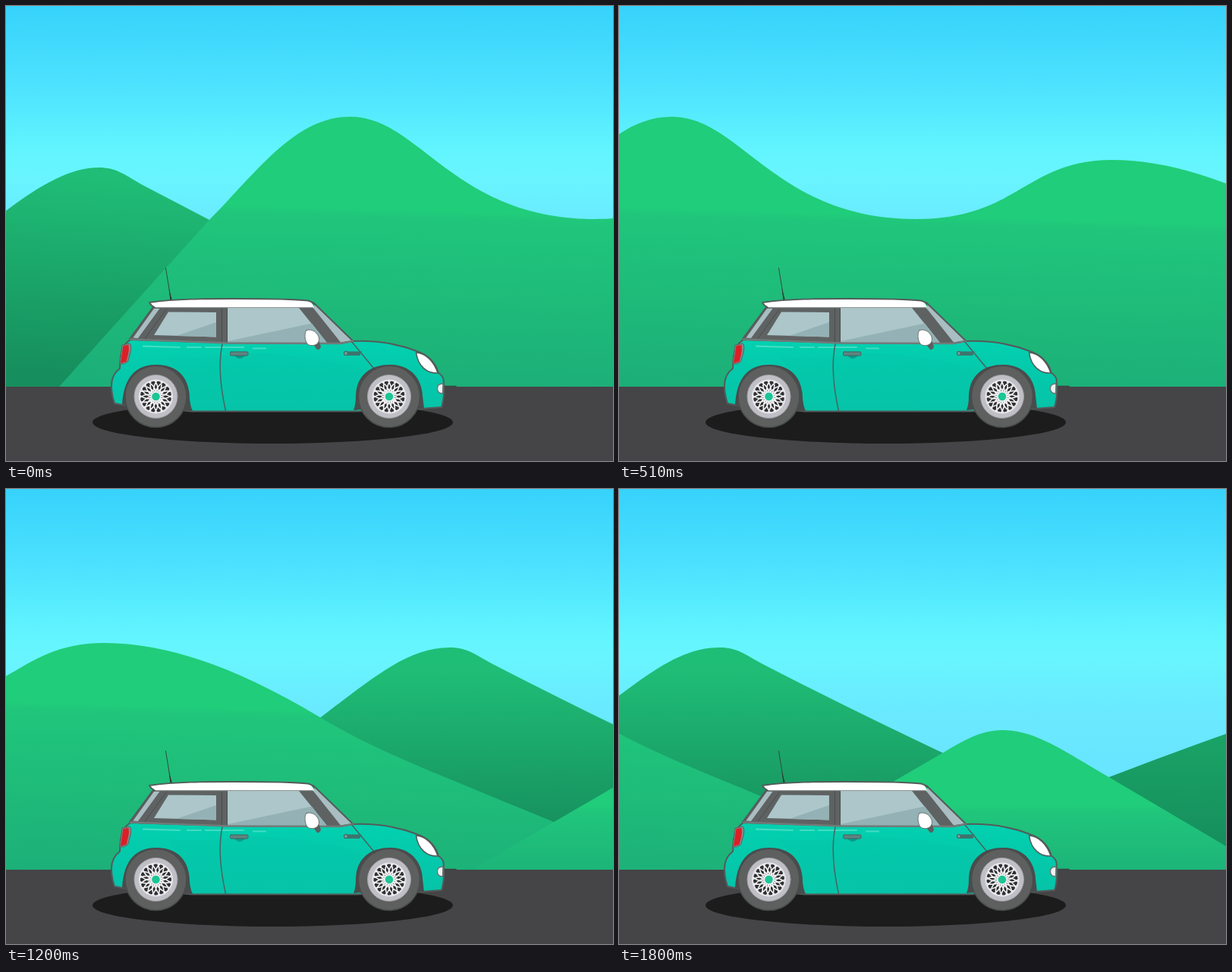
An HTML page that plays this animation: 800 px wide and 600 px high, repeating every 1830 ms.

```html
<!DOCTYPE html>
<html lang="en">
<head>
<meta charset="utf-8">
<title>Driving past the hills</title>
<style>
  html, body { margin: 0; width: 100%; height: 100%; overflow: hidden; background: #454547; }
  svg { display: block; width: 800px; height: 600px; }
</style>
</head>
<body>
<svg viewBox="0 0 800 600" xmlns="http://www.w3.org/2000/svg">
  <defs>
    <linearGradient id="sky" gradientUnits="userSpaceOnUse" x1="0" y1="0" x2="0" y2="400">
      <stop offset="0" stop-color="#37d2fb"/>
      <stop offset=".25" stop-color="#4ce1fe"/>
      <stop offset=".48" stop-color="#62f5ff"/>
      <stop offset=".56" stop-color="#68f5ff"/>
      <stop offset=".72" stop-color="#6aeaff"/>
      <stop offset="1" stop-color="#68e3ff"/>
    </linearGradient>
    <linearGradient id="front" gradientUnits="userSpaceOnUse" x1="285" y1="262" x2="278" y2="502">
      <stop offset="0" stop-color="#20cd7a"/>
      <stop offset=".04" stop-color="#20c67b"/>
      <stop offset="1" stop-color="#1cae78"/>
    </linearGradient>
    <linearGradient id="low" gradientUnits="userSpaceOnUse" x1="0" y1="418" x2="0" y2="502">
      <stop offset="0" stop-color="#20cd7a"/>
      <stop offset=".08" stop-color="#20c67b"/>
      <stop offset="1" stop-color="#1db479"/>
    </linearGradient>
    <linearGradient id="backA" gradientUnits="userSpaceOnUse" x1="100" y1="225" x2="82" y2="490">
      <stop offset="0" stop-color="#1fbd76"/>
      <stop offset="1" stop-color="#168e5d"/>
    </linearGradient>
    <linearGradient id="backB" gradientUnits="userSpaceOnUse" x1="0" y1="235" x2="0" y2="440">
      <stop offset="0" stop-color="#1fbe77"/>
      <stop offset="1" stop-color="#17925f"/>
    </linearGradient>
    <linearGradient id="backC" gradientUnits="userSpaceOnUse" x1="0" y1="320" x2="0" y2="480">
      <stop offset="0" stop-color="#1aa467"/>
      <stop offset="1" stop-color="#168d5c"/>
    </linearGradient>
    <linearGradient id="paint" gradientUnits="userSpaceOnUse" x1="0" y1="440" x2="0" y2="535">
      <stop offset="0" stop-color="#02d1b0"/>
      <stop offset=".4" stop-color="#04caac"/>
      <stop offset="1" stop-color="#06c3a8"/>
    </linearGradient>

    <g id="tyre">
      <circle r="40.500" fill="#5e5f5f" stroke="#4b4d4d" stroke-width="1.5"/>
      <circle r="28.500" fill="#c0bfc6" stroke="#a09fa6"/>
      <circle r="22.500" fill="#e6e5ea"/>
    </g>
  </defs>

  <rect width="800" height="510" fill="url(#sky)"/>

  <g id="hills">
    <path fill="url(#backA)" d="M-80 340L0 270C45 236 85 213 122 213C145 213 156 222 178 235L268 282L688 502H-80Z"/>
    <path fill="url(#backC)" d="M1720 502L2002 380Q2080 350 2156 323L2250 290V502Z"/>
    <path fill="url(#backB)" d="M1040 502L1319 301C1390 247 1435 209 1489 209C1513 209 1523 219 1546 231Q1660 290 1783 348L2093 502Z"/>
    <path fill="url(#front)" d="M70 502L268 282C335 214 382 146 454 146C545 146 590 281 776 281C910 281 920 203 1034 203
      C1130 203 1230 248 1318 301C1395 347 1460 370 1626 439L1770 502Z"/>
    <path fill="url(#low)" d="M1518 502L1783 348C1810 332 1833 318 1861 318C1905 318 1940 344 2002 380L2209 502Z"/>
  </g>

  <rect y="502" width="800" height="98" fill="#454547"/>
  <ellipse cx="351.500" cy="549" rx="237.500" ry="28" fill="#1c1c1c"/>

  <g id="car" stroke-linejoin="round" stroke-linecap="round">
    <path d="M210.500 345.500L217.500 388" fill="none" stroke="#2f4a40"/>
    <path d="M214.500 372L216.500 388H219Z" fill="#2f3836"/>
    <path d="M576 501.500H593" stroke="#3b4542" stroke-width="1.600"/>

    <!-- body -->
    <path fill="url(#paint)" stroke="#535b5a" stroke-width="2" d="M164 440C156 445 153 452 151 463L150 478
      C143 483 139 490 139 501C139 510 141 518 143 524L153 526L245 534.500H462L548 531L574 529C577 520 578 508 576.500 492
      Q575 487 570 484C566 470 556 460 541 455C515 445 485 441 457 442L440 445L292 444Z"/>
    <path d="M210 461C250 470 300 456 350 459S440 470 470 480L462 533H245L235 490Z" fill="#06c3a8" opacity=".4"/>

    <!-- cabin -->
    <path d="M163 439L194 397H403L457 442L440 445L292 444Z" fill="#5f6262"/>
    <path d="M167.500 437.500L195 399H202.500L174 438Z" fill="#a9bec2"/>
    <path d="M183 438.500L212 399" fill="none" stroke="#4a4e4e"/>
    <path d="M195 434L214 403.500L277 404V436.500Z" fill="#acc6ca"/>
    <path d="M224 435L277 417V436.500Z" fill="#94b2b5"/>
    <path d="M284.500 399V443M291.500 399V443" stroke="#484c4c"/>
    <path d="M292 398H386L423 444L292 443.500Z" fill="#acc6ca"/>
    <path d="M292 442L403 418.500L423 444L292 443.500Z" fill="#94b2b5"/>
    <path d="M404 397L408 394L456 441L441 443.500Z" fill="#a9bec2"/>
    <path d="M405 391L457 441.500M163 439L194 397" fill="none" stroke="#535b5a" stroke-width="2"/>
    <path d="M164 439.500L292 444.500L440 445L457 442" fill="none" stroke="#717b7a" stroke-width="2.400"/>

    <!-- roof -->
    <path d="M189 391C225 386 262 386 300 386C342 386 375 386 398 388.500Q403 389.500 406 397.500H196Q191 395 189 391Z" fill="#fff"/>
    <path d="M196 397.700H404" stroke="#8b9292" stroke-width=".8"/>
    <path d="M196 397.500Q191 395 189 391C225 386 262 386 300 386C342 386 375 386 398 388.500Q403 389.500 406 393"
      fill="none" stroke="#535b5a" stroke-width="1.800"/>

    <!-- trim -->
    <path d="M181 448.700L229 450M239 450H257M263 450H313M326 451.500H342" fill="none" stroke="#43dcc3" stroke-width="2.200"/>
    <path d="M285 446C280 470 282 500 289.500 534M456 443L484 477" fill="none" stroke="#466460" stroke-width="1.500"/>
    <path d="M301 461Q308 469 315 461Z" fill="#079c8a"/>
    <rect x="295.500" y="456" width="23.500" height="5" rx="1.500" fill="#5d8581" stroke="#46615e"/>
    <path d="M446 455.500H469L466 461H446Z" fill="#3c756e"/>
    <circle cx="448" cy="458" r="2.700" fill="#6d9994" stroke="#46615e"/>
    <path d="M403 444L412 441L415 449Q414 454 410 453Z" fill="#5a5f5f"/>
    <path d="M396 427.500C404 425 411 431 412.500 438C413 445 408 448.500 401 447.500C394 447 392 432 396 427.500Z" fill="#fff" stroke="#6b7272"/>
    <path d="M153.500 447L163 445Q166 448 164 457L160.500 469Q156 473 150 472Z" fill="#8b8587" stroke="#5c6262"/>
    <path d="M154.500 448L161.500 447Q162.500 452 161 459L158.500 469L151 471Z" fill="#dc1f26"/>
    <path d="M540.500 457C553 458 564 468 569 484C555 485 543 475 540.500 457Z" fill="#fff" stroke="#535b5a" stroke-width="1.600"/>
    <path d="M576 498Q568 498 568.500 505Q569 511 575.500 511Z" fill="#eef1f1" stroke="#6b7675" stroke-width="1.400"/>

    <!-- wheel arches -->
    <path d="M153 526C155 490 171 473 198 473C228 473 242 492 242 518Q243 528 246 534H220Z" fill="#484c4c"/>
    <path d="M458 533Q461 526 461 514C462 488 479 473 506 473C533 473 548 491 549 514L551 531H480Z" fill="#484c4c"/>
    <use href="#tyre" x="197.500" y="515"/>
    <use href="#tyre" x="505" y="515"/>
  </g>
</svg>
<script>
  const LOOP = 1830, STEP = 30;
  const SCROLL = 0.7535; // px per ms
  const SPIN = 1.19;     // degrees per ms
  const SPOKES = 16;
  const svg = document.querySelector('svg');
  const hills = document.getElementById('hills');

  function add(parent, tag, attrs) {
    const el = document.createElementNS('http://www.w3.org/2000/svg', tag);
    for (const key in attrs) el.setAttribute(key, attrs[key]);
    return parent.appendChild(el);
  }

  const polar = (r, a) => `${(r * Math.cos(a)).toFixed(2)} ${(r * Math.sin(a)).toFixed(2)}`;

  // Crossing spokes that lean both ways form the mesh of the rim.
  function meshPath() {
    let d = '';
    for (let i = 0; i < SPOKES; i++) {
      const a = i * 2 * Math.PI / SPOKES;
      for (const lean of [-1, 1]) {
        d += `M${polar(6, a)}Q${polar(14, a + lean * 0.1)} ${polar(21, a + lean * 0.46)}`;
      }
    }
    return d;
  }

  function makeRim(x) {
    const place = add(svg, 'g', { transform: `translate(${x} 515)` });
    const rim = add(place, 'g', {});
    add(rim, 'circle', { r: 20.5, fill: '#303132' });
    add(rim, 'path', { d: meshPath(), fill: 'none', stroke: '#f4f3f6', 'stroke-width': 1.6 });
    add(rim, 'circle', { r: 7, fill: '#efeff2' });
    add(rim, 'circle', { r: 5.3, fill: '#1cc595' });
    return rim;
  }

  const rims = [197.5, 505].map(makeRim);
  const start = performance.now();

  function draw(now) {
    const t = Math.floor((Math.max(0, now - start) % LOOP) / STEP) * STEP;
    hills.setAttribute('transform', `translate(${(-SCROLL * t).toFixed(2)} 0)`);
    for (const rim of rims) rim.setAttribute('transform', `rotate(${(SPIN * t).toFixed(2)})`);
    requestAnimationFrame(draw);
  }
  draw(start);
</script>
</body>
</html>
```
